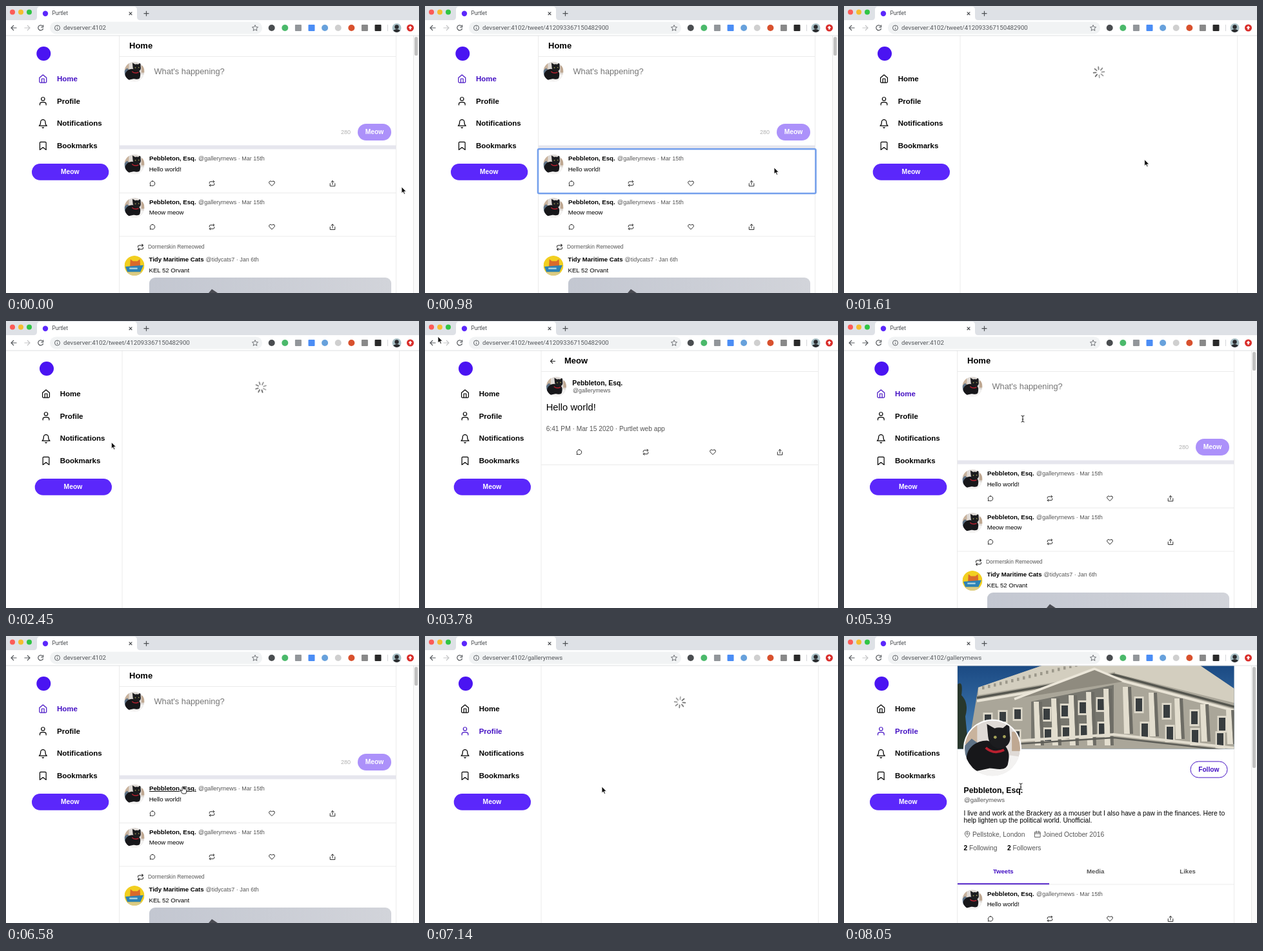
An HTML page for the animation above (8400 ms loop, 640 by 446 pixels).

```html
<!DOCTYPE html>
<html lang="en">
<head>
<meta charset="utf-8">
<title>Purtlet</title>
<style>
  html, body { margin: 0; height: 100%; overflow: hidden; background: #fff; }
  svg { display: block; width: 100vw; height: 100vh; }
  text { font-family: "Liberation Sans", Arial, sans-serif; white-space: pre; }
  .ui { font-family: Roboto, sans-serif; }
</style>
</head>
<body>
<svg id="stage" viewBox="0 0 640 446"></svg>
<script>
const PURPLE = '#5b27fb', DEEP = '#4512c4', GREY = '#555', LINE = '#ebebeb';
const NAME = 'Pebbleton, Esq.', HANDLE = '@gallerymews', HOST = 'devserver:4102';

// Drawing helpers
const text = (x, y, size, str, attrs = '') =>
  `<text x="${x}" y="${y}" font-size="${size}" ${attrs}>${str}</text>`;
const bold = (x, y, size, str, attrs = '') => text(x, y, size, str, `font-weight="700" ${attrs}`);
const rect = (x, y, w, h, fill, r = 0, attrs = '') =>
  `<rect x="${x}" y="${y}" width="${w}" height="${h}" rx="${r}" fill="${fill}" ${attrs}/>`;
const circle = (x, y, r, fill, attrs = '') => `<circle cx="${x}" cy="${y}" r="${r}" fill="${fill}" ${attrs}/>`;
const path = (d, fill, attrs = '') => `<path d="${d}" fill="${fill}" ${attrs}/>`;
const stroke = (d, color, width = 1, attrs = '') =>
  path(d, 'none', `stroke="${color}" stroke-width="${width}" ${attrs}`);
const group = (id, body, attrs = '') => `<g id="${id}" ${attrs}>${body}</g>`;
const mid = 'text-anchor="middle"';
const times = (n, fn) => Array.from({ length: n }, (_, i) => fn(i)).join('');

// Line icons on a 24-unit grid
const ICONS = {
  home: 'M3 9.5l9-7.5 9 7.5V20a2 2 0 0 1-2 2H5a2 2 0 0 1-2-2zM9 22V12h6v10',
  user: 'M20 22v-2a5 5 0 0 0-5-5H9a5 5 0 0 0-5 5v2M12 2a4.5 4.5 0 1 0 .01 0z',
  bell: 'M18 8A6 6 0 0 0 6 8c0 7-4 10-4 10h20s-4-3-4-10M14 21.5a2 2 0 0 1-4 0',
  bookmark: 'M20 22l-8-6-8 6V4a2 2 0 0 1 2-2h12a2 2 0 0 1 2 2z',
  comment: 'M12 3a9 9 0 1 1-4.2 17L3 21l1.2-4.6A9 9 0 0 1 12 3z',
  repeat: 'M17 1l4 4-4 4M3 12V9a4 4 0 0 1 4-4h14M7 23l-4-4 4-4M21 12v3a4 4 0 0 1-4 4H3',
  heart: 'M20.8 4.6a5.5 5.5 0 0 0-7.8 0L12 5.7l-1-1.1a5.5 5.5 0 0 0-7.8 7.8L12 21.2l8.8-8.8a5.5 5.5 0 0 0 0-7.8z',
  share: 'M3 12v10h18V12M17 7l-5-5-5 5M12 2v14',
  pin: 'M20 10c0 6-8 13-8 13S4 16 4 10a8 8 0 0 1 16 0zM12 7a3 3 0 1 0 .01 0z',
  calendar: 'M3 5h18v17H3zM3 10h18M8 1v6M16 1v6',
};
const icon = (name, x, y, size, color = '#222', width = 2) =>
  `<g transform="translate(${x} ${y}) scale(${size / 24}) translate(-12 -12)">${stroke(ICONS[name], color, width, 'stroke-linejoin="round" stroke-linecap="round"')}</g>`;

const actions = (y, xs) =>
  ['comment', 'repeat', 'heart', 'share'].map((name, i) => icon(name, xs[i], y, 10, '#222', 2.3)).join('');

const avatar = (x, y, r, id = 'cat') =>
  `<use href="#${id}" transform="translate(${x} ${y}) scale(${r})"/>`;

const defs = `<defs>
  <clipPath id="disc"><circle r="1"/></clipPath>
  <clipPath id="banner"><rect x="176" y="46" width="428.5" height="129.5"/></clipPath>
  <linearGradient id="sky" x2="0" y2="1"><stop stop-color="#1b4a83"/><stop offset="1" stop-color="#4a86bd"/></linearGradient>
  <linearGradient id="cloud" x2="1"><stop stop-color="#c3c7d1"/><stop offset="1" stop-color="#d2d4da"/></linearGradient>
  <g id="cat" clip-path="url(#disc)">
    ${circle(0, 0, 1, '#dfdad6')}${rect(-1, -1, .45, .85, '#c9b39d')}${rect(.7, -.6, .3, .7, '#bfa892')}
    ${path('M-1-.1L-.75-.35-.4-.1-.8.5-1 .5z', '#5f7387')}${path('M-1 .55L.6.25 1 .3V1H-1z', '#f3f2f1')}
    ${path('M-.93.4C-.95 0-.6-.28-.2-.28L.45-.1C.65.15.6.35.55.6.45.85.1.72-.1.72L-.55.82C-.75.75-.9.65-.93.4z', '#17171a')}
    ${path('M-.16-.45L-.2-.88.08-.72Q.22-.78.38-.73L.6-.92.63-.45C.68-.2.5 0 .26 0S-.14-.2-.16-.45z', '#1c1c1f')}
    ${stroke('M-.24-.02Q.05.24.42.06', '#b8202f', .09)}
    ${circle(.1, -.4, .055, '#a7a55a')}${circle(.43, -.42, .055, '#a7a55a')}
  </g>
  <g id="sailor" clip-path="url(#disc)">
    ${circle(0, 0, 1, '#f2cf20')}${path('M-.45.2L-.4-.65-.15-.45H.3L.55-.65.6.2z', '#d96a2b')}
    ${path('M-.9.1L.9-.05.6.65H-.7z', '#2d82b5')}${path('M-1 .65H1V1H-1z', '#dccb83')}
    ${rect(-.5, .2, .8, .16, '#a5d0df')}
  </g>
</defs>`;

function chrome() {
  const lights = ['#fc5b57', '#f5bd2f', '#30c544'].map((c, i) => circle(10 + 13 * i, 9.5, 4, c)).join('');
  const extensions = ['#4a4d50', '#4bb96b', '#92969a', '#4b8df5', '#67a1dc', '#cfcfcf', '#d8512e', '#898989', '#292929']
    .map((c, i) => {
      const x = 411.7 + 20.6 * i;
      return [2, 3, 7, 8].includes(i) ? rect(x - 5, 29, 10, 10, c, 1) : circle(x, 34, 5, c);
    }).join('');
  return rect(0, 0, 640, 22, '#dee1e6') + rect(0, 22, 640, 24, '#fff') + lights +
    path('M43 22Q48 22 48 17V6Q48 1 53 1H198Q203 1 203 6V17Q203 22 208 22z', '#fff') +
    circle(61, 11.7, 4.2, PURPLE) + text(71.5, 14.4, 8.2, 'Purtlet', 'class="ui" fill="#45484c"') +
    stroke('M190.7 9.4l4.6 4.6m0-4.6l-4.6 4.6M213.5 11.7h8m-4-4v8', '#4c4f53', 1.2) +
    stroke('M16.5 34H8m4-4l-4 4 4 4', '#55585c', 1.2) +
    stroke('M28.5 34H37m-4-4l4 4-4 4', '#c3c4c6', 1.2, 'id="forward"') +
    stroke('M56.8 31.2A4 4 0 1 0 57.6 35M57.6 29.6v3.3h-3.3', '#55585c', 1.2) +
    rect(68, 24.5, 329, 19, '#f1f3f4', 9.5) + circle(79.5, 34, 4, 'none', 'stroke="#606468"') +
    stroke('M79.5 33.5v2.7m0-4.3v-1', '#606468', 1) +
    text(89, 37.3, 9.7, '', 'class="ui" fill="#55585c" id="url"') +
    path('M386 29.6l1.3 3 3.3.3-2.5 2.2.8 3.2-2.9-1.7-2.9 1.7.8-3.2-2.5-2.2 3.3-.3z', 'none', 'stroke="#606468" stroke-width=".9"') +
    extensions + rect(591, 29, 1, 10, '#d3d5d8') +
    circle(605.5, 34, 7, '#a9c0c6') + circle(605.5, 32.5, 3.2, '#292a2d') + path('M600 38.3Q605.5 33.5 611 38.3Q605.5 43.5 600 38.3z', '#292a2d') +
    circle(626.5, 34, 5.5, '#d92d2a') + path('M626.5 30.7l3 3.2h-1.8v2.6h-2.4v-2.6h-1.8z', '#fff') +
    rect(0, 45.5, 640, 1, '#dddfe2');
}

function sidebar() {
  const items = [['home', 'Home'], ['user', 'Profile'], ['bell', 'Notifications'], ['bookmark', 'Bookmarks']];
  return circle(58.3, 74, 11, '#4a14f2') +
    items.map(([name, label], i) => {
      const y = 113 + 34.8 * i;
      return group('nav' + i, icon(name, 57.3, y, 14.5, 'currentColor') +
        bold(79, y + 3.7, 11.5, label, 'fill="currentColor"'));
    }).join('') +
    rect(40, 245, 119.3, 25.7, PURPLE, 12.8) + bold(99.2, 261.2, 10.3, 'Meow', `fill="#fff" ${mid}`);
}

const columns = (left, right) => rect(left, 46, 1, 400, LINE) + rect(right, 46, 1, 400, LINE);
const scrollbar = h => rect(631, 46, 9, 400, '#fafafa') + rect(631, 46, 1, 400, '#e8e8e8') + rect(633, 48, 5.2, h, '#c1c1c1', 2.6);

const post = (y, body, attrs = '') =>
  avatar(199, y + 6, 15.5) + bold(222, y, 9.7, NAME, attrs) +
  text(298, y, 9, HANDLE + ' · Mar 15th', `fill="${GREY}"`) +
  text(221.7, y + 16.7, 9.6, body) + actions(y + 35.8, [227, 319, 412, 506]);

function home() {
  return columns(175, 604) + scrollbar(29) + bold(191, 66.2, 13, 'Home') + rect(176, 78, 428, 1, LINE) +
    avatar(199, 102, 15.5) + text(229.5, 105.5, 12.8, "What's happening?", 'fill="#757575"') +
    text(519, 199.3, 9, '280', 'fill="#b0b0b0"') + rect(545, 183, 52, 26, '#ac91fa', 13) +
    bold(571, 199.4, 10.3, 'Meow', `fill="#fff" ${mid}`) + rect(176, 216.5, 428, 6, '#e6e6ee') +
    post(240, 'Hello world!', 'id="author"') + rect(176, 290, 428, 1, LINE) +
    post(307.5, 'Meow meow') + rect(176, 357.5, 428, 1, LINE) +
    icon('repeat', 208.5, 375, 10.5, '#222', 2.3) + text(220, 377.3, 8.4, 'Dormerskin Remeowed', `fill="${GREY}"`) +
    avatar(199, 403.5, 15.5, 'sailor') + bold(221.5, 397, 9.6, 'Tidy Maritime Cats') +
    text(309.5, 397, 9, '@tidycats7 · Jan 6th', `fill="${GREY}"`) + text(221.5, 413.8, 9.6, 'KEL 52 Orvant') +
    rect(222, 422, 375, 50, 'url(#cloud)', 9) + path('M314 446L319 440 328 446z', '#4a4b52') +
    group('focus', rect(175, 222.3, 430.5, 69, 'none', 2, 'stroke="#75a0ec" stroke-width="2.6"'));
}

const loading = () => columns(179.5, 609) +
  group('spinner', times(8, i => stroke('M0-4.5V-8.3', '#6f6f6f', 1.9, `opacity="${1 - i * .06}" stroke-linecap="round" transform="rotate(${i * 45})"`)));

function detail() {
  return columns(179.5, 609) + stroke('M202 62.5h-7.5m3.5-3.5l-3.5 3.5 3.5 3.5', '#222', 1.1) +
    bold(216, 66.2, 13, 'Meow') + rect(180, 78, 429, 1, LINE) + avatar(203.5, 102, 15.5) +
    bold(228.3, 99.6, 10.4, NAME) + text(229, 111, 8.9, HANDLE, `fill="${GREY}"`) +
    text(187.7, 139.4, 14.75, 'Hello world!') +
    text(187.7, 170.8, 10.2, '6:41 PM · Mar 15 2020 · Purtlet web app', `fill="${GREY}"`) +
    actions(203.8, [239, 342, 446, 550]) + rect(180, 223, 429, 1, LINE);
}

// Flat-shape stand-in for the banner photograph
function building() {
  const stone = '#d3cebf', shade = '#9c988b', dark = '#383d3f';
  const windowAt = (x, y, h) => rect(x - 2.5, y - 3, 15, h + 6, '#dcd7c9') + rect(x, y, 10, h, dark);
  const column = (x, y, bottom) =>
    path(`M${x} ${y}h8l3 ${bottom - y}h-9z`, '#e3decf') + path(`M${x + 8} ${y}h5l3 ${bottom - y}h-5z`, '#6d6c65');
  return `<g clip-path="url(#banner)">` + rect(176, 46, 429, 130, 'url(#sky)') +
    path('M208 80L307 46H552L605 82V176H192z', '#aaa699') +
    path('M208 80L307 46H420V56L208 92z', stone) + path('M420 46H552L605 82V104L420 58z', stone) +
    times(22, i => rect(214 + 9 * i, 78 - 2.2 * i, 3.5, 5, shade)) +
    stroke('M206 96L418 60L605 110', '#55564f', 3.5) + stroke('M206 101L418 66L605 116', '#e8e3d5', 4) +
    path('M268 97L388 50 432 71z', '#8f8b7f') + stroke('M264 98L388 51 436 71', '#ebe6d9', 3.5) +
    path('M290 102L418 76V150L290 162z', '#77766e') +
    times(3, i => windowAt(218 + 23 * i, 122 - 4 * i, 15) + windowAt(216 + 23 * i, 152 - 2 * i, 16)) +
    times(4, i => windowAt(309 + 28 * i, 113 - 5 * i, 17) + windowAt(311 + 28 * i, 145 - 3 * i, 18)) +
    times(5, i => column(294 + 27 * i, 102 - 5 * i, 170)) +
    times(4, i => windowAt(452 + 43 * i, 97 + 10 * i, 20) + windowAt(461 + 39 * i, 136 + 5 * i, 21)) +
    times(5, i => column(432 + 40 * i, 79 + 9 * i, 152 + 4 * i)) +
    stroke('M188 168L418 153L605 174', '#e2ddcf', 4) + stroke('M188 173L418 158L605 179', '#5d5d57', 2.5) +
    path('M176 75Q185 68 182 92Q194 104 188 125L193 176H176z', '#28372c') + '</g>';
}

function profile() {
  const grey = `fill="${GREY}"`;
  return columns(175, 604) + scrollbar(157) + building() + circle(230, 174.5, 45, '#fff') + avatar(230, 174.5, 43) +
    rect(537, 195, 57, 25, '#fff', 12.5, `stroke="${DEEP}" stroke-width="1"`) +
    bold(565.3, 211, 10.2, 'Follow', `fill="${DEEP}" ${mid}`) +
    bold(185.6, 243.5, 12.2, NAME) + text(186, 258, 9.6, HANDLE, grey) +
    text(185.6, 278.7, 10.25, 'I live and work at the Brackery as a mouser but I also have a paw in the finances. Here to') +
    text(185.6, 290.3, 10.25, 'help lighten up the political world. Unofficial.') +
    icon('pin', 191, 308, 11, GREY) + text(199, 311.8, 10.25, 'Pellstoke, London', grey) +
    icon('calendar', 300, 308, 11, GREY) + text(308, 311.8, 10.25, 'Joined October 2016', grey) +
    [185.5, 253].map((x, i) => bold(x, 332.7, 10.25, '2') + text(x + 8.6, 332.7, 10.25, ['Following', 'Followers'][i], grey)).join('') +
    ['Tweets', 'Media', 'Likes'].map((s, i) => bold(246.8 + 142.9 * i, 369, 9.6, s, `${mid} fill="${i ? GREY : DEEP}"`)).join('') +
    rect(176, 385.5, 428, 1, LINE) + rect(176, 384.3, 142, 1.8, DEEP) + post(403.7, 'Hello world!');
}

const cursors =
  group('arrow', path('M0 0V10L2.3 7.9 3.9 11.5 5.5 10.8 4 7.3H7.2z', '#111', 'stroke="#fff" stroke-width=".8"')) +
  group('beam', stroke('M-2.5-5Q0-5 0-3.5Q0-5 2.5-5M0-4V4M-2.5 5Q0 5 0 3.5Q0 5 2.5 5M-1.2.8H1.2', '#222', 1)) +
  group('hand', path('M-1 .8Q0-.6 1 .8V4Q2 3 2.7 4.2Q3.8 3.3 4.3 4.6Q5.5 4 5.7 5.5V8L4.6 11H-.6L-3.4 6.8Q-3.2 5.2-1.8 6L-1 6.8z', '#fff', 'stroke="#111" stroke-width=".9"'));

document.getElementById('stage').innerHTML = defs + rect(0, 0, 640, 446, '#fff') +
  group('home', home()) + group('loading', loading()) + group('detail', detail()) + group('profile', profile()) +
  group('sidebar', sidebar()) + chrome() + group('cursor', cursors);

const $ = id => document.getElementById(id);
const show = (id, on) => { $(id).style.display = on ? '' : 'none'; };

// Pointer stops: time, x, y
const ROUTE = [
  [0, 613, 281], [280, 613, 281], [840, 541, 251], [1300, 541, 251], [2380, 164, 189], [2660, 160, 185],
  [3500, 22, 26], [3780, 20, 24], [4130, 12, 32], [4550, 12, 32], [5250, 277, 152], [5600, 277, 152],
  [6370, 274, 234], [8400, 274, 234],
];
function pointer(t) {
  const i = ROUTE.findIndex(stop => stop[0] > t);
  const [t0, x0, y0] = ROUTE[i - 1], [t1, x1, y1] = ROUTE[i];
  const p = (t - t0) / (t1 - t0), e = p * p * (3 - 2 * p);
  return [x0 + (x1 - x0) * e, y0 + (y1 - y0) * e];
}

// Page changes: start time, scene, path
const PAGES = [
  [0, 'home', ''], [910, 'home', '/tweet/412093367150482900'], [1120, 'loading', '/tweet/412093367150482900'],
  [2590, 'detail', '/tweet/412093367150482900'], [4620, 'home', ''],
  [6720, 'loading', '/gallerymews'], [7210, 'profile', '/gallerymews'],
];

function draw(t) {
  const [, scene, route] = PAGES.findLast(page => page[0] <= t);
  const wide = scene === 'loading' || scene === 'detail';
  const [x, y] = pointer(t);
  for (const id of ['home', 'loading', 'detail', 'profile']) show(id, id === scene);
  $('url').textContent = HOST + route;
  $('forward').setAttribute('stroke', t >= 4620 && t < 6720 ? '#55585c' : '#c3c4c6');
  $('sidebar').setAttribute('transform', `translate(${wide ? 4.7 : 0} 0)`);
  const active = scene === 'home' ? 0 : route === '/gallerymews' ? 1 : -1;
  for (let i = 0; i < 4; i++) $('nav' + i).style.color = i === active ? DEEP : '#000';
  show('focus', route);
  $('spinner').setAttribute('transform', `translate(395 103) rotate(${t * .36 % 360})`);

  const onName = scene === 'home' && x > 222 && x < 295 && y > 230 && y < 243;
  const onText = scene === 'profile' || scene === 'home' && x > 225 && x < 600 && y > 85 && y < 180;
  $('author').style.textDecoration = onName ? 'underline' : 'none';
  show('hand', onName);
  show('beam', onText);
  show('arrow', !onName && !onText);
  $('cursor').setAttribute('transform', `translate(${x} ${y})`);
}

const start = performance.now();
function tick() {
  const t = (performance.now() - start) % 8400;
  draw(Math.min(8050, Math.floor(t / 70) * 70));
  requestAnimationFrame(tick);
}
tick();
</script>
</body>
</html>
```
